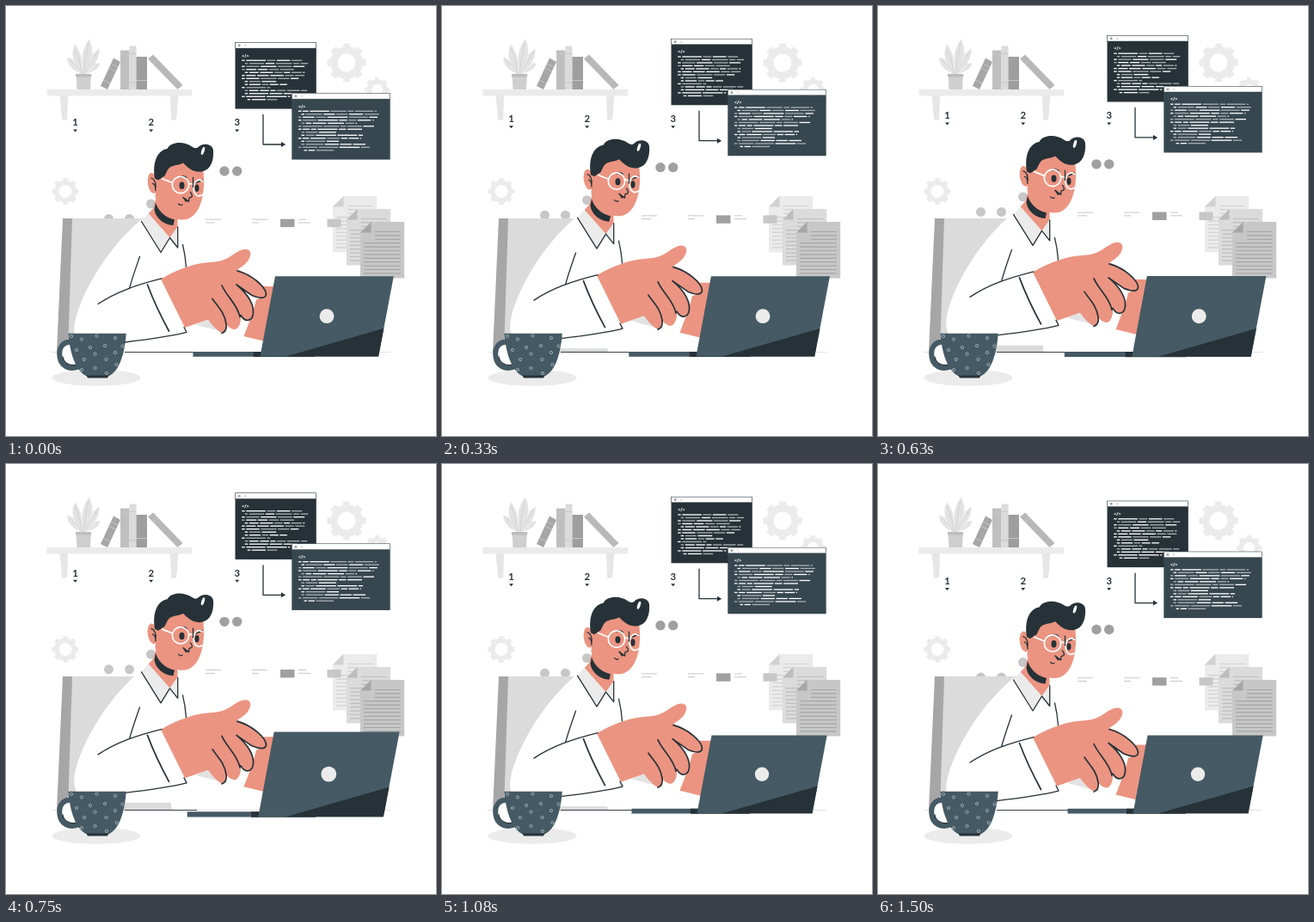
These frames come from a looping animation (500x500 px, 1.54 s). An HTML page:

```html
<!DOCTYPE html>
<html lang="en">
<head>
<meta charset="utf-8">
<title>Developer at work</title>
<style>
  html, body { margin: 0; width: 100%; height: 100%; overflow: hidden; background: #fff; }
  svg { display: block; width: 100%; height: 100%; }
  .ink { fill: none; stroke: #263238; stroke-width: 1.3; stroke-linecap: round; stroke-linejoin: round; }
  .bold { stroke-width: 1.7; }
  .dark { fill: #263238; }
  .skin { fill: #eb9481; }
  .label { font: 700 11.3px Lato, sans-serif; text-anchor: middle; fill: #263238; }
  .tag { font: 700 5.6px "Open Sans", sans-serif; fill: #fff; }
</style>
</head>
<body>
<svg viewBox="0 0 500 500">
  <g id="gears" fill="none" stroke="#ebebeb"></g>

  <g id="shelf">
    <path fill="#e6e6e6" d="M62.5 104h9.5l-.8 28.5h-6zM191 104h9.5l-2.5 28.5h-6z"/>
    <path fill="#ebebeb" d="M47.5 97h168.5v7.5h-168.5z"/>
    <g fill="#e3e3e3" stroke="#fff" stroke-width=".6">
      <path d="M89 80C78 76 70 68 71 59C81 63 88 71 90 80z"/>
      <path d="M91 80C99 77 108 75 110 66C101 66 94 72 91 80z"/>
      <path d="M88 80C78 68 74 56 80 44C88 54 91 68 90 80z"/>
      <path d="M91 80C92 66 98 56 109 49C109 62 102 73 91 80z"/>
      <path d="M90 80C86 64 88 48 97 38C104 52 100 68 90 80z"/>
    </g>
    <path fill="none" stroke="#c7c7c7" stroke-width=".6" d="M90 80Q92 60 96 43M89 80Q86 62 80 49M91 80Q98 64 107 53M89 80Q82 69 74 62"/>
    <path fill="#cfcfcf" d="M81.5 79h17.5l-1 18h-15.5z"/>
    <path fill="#bdbdbd" d="M81 79h18.2v3.5h-18.2z"/>
    <path fill="#a6a6a6" d="M125 60.5l8 4.5-15 32-8-4z"/>
    <path fill="#bfbfbf" d="M133 51.5h10.5v45.5h-10.5z"/>
    <path fill="#dbdbdb" d="M143.5 46.5h8v50.5h-8z"/>
    <path fill="#9e9e9e" d="M151.5 59h12.5v38h-12.5z"/>
    <path fill="#b8b8b8" d="M165 61.5l6-5 34.5 35.5-6 5z"/>
    <path fill="none" stroke="#c7c7c7" d="M122 67l8 4M119.5 72l8 4M113 86l8 4M133 56h10.5M143.5 55.5h8M143.5 89h8M151.5 86.5h12.5M171 67.5l6-5M194 91l6-5"/>
  </g>

  <g id="pages"></g>

  <g class="float">
    <g id="steps"></g>
    <path fill="#a0a0a0" d="M319 248.2h16.5v9.4h-16.5z"/>
    <path fill="#c7c7c7" d="M373.5 248.2h16v9.4h-16z"/>
    <path stroke="#c7c7c7" d="M232 248.7h18M232 252.5h11M286 248.7h18M286 252.5h8M340 248.7h9M340 252.5h14"/>
    <g fill="#c7c7c7"><circle cx="119.5" cy="248" r="5.5"/><circle cx="143.5" cy="248" r="5.5"/><circle cx="168.5" cy="230.5" r="5.5"/></g>
    <g fill="#a0a0a0"><circle cx="254" cy="192.5" r="5.7"/><circle cx="268.7" cy="192.5" r="5.7"/></g>
    <path class="ink" stroke-linecap="butt" d="M299 127V161.5H321"/>
    <path class="dark" d="M320 158.5l5.2 3-5.2 3z"/>
    <g id="windows"></g>
  </g>

  <path fill="#dbdbdb" d="M76 247H167L193 402.5H70z"/>
  <path fill="#a6a6a6" d="M66 247H77L72 402.5H59z"/>
  <path stroke="#d0d0d0" stroke-width=".6" d="M53 402.5H447"/>

  <g class="float">
    <path class="skin" d="M299 326.5H316L303 391L276.5 384.5L287 357L291 342L302 337z"/>
    <path fill="#fff" d="M157 249C113 286 84 342 79.5 372C78 384 82 394 90 403H222L234 380L214 320L207 281L199.5 256z"/>
    <path fill="#e3e3e3" d="M220 371L242 361L258 381z"/>

    <path class="skin" d="M174 226L171 236L165.5 242L190.5 270L199.5 258V240z"/>
    <path class="dark" d="M174 229C177 239 185 246.5 196 249L194.5 255.5C183 255 174 247 172.5 237z"/>
    <path fill="#ebebeb" d="M165.5 241.5L157.5 251L180 287L190.5 270zM190.5 270L199.5 281V257z"/>
    <path class="ink" d="M157.5 251L180 287L190.5 270L199.7 281.5V257.5"/>
    <path class="ink" d="M205.5 278Q208.5 290 209.5 304"/>

    <g id="head">
      <ellipse class="skin" cx="170.5" cy="206.5" rx="5.7" ry="12" transform="rotate(-8 170.5 206.5)"/>
      <path class="skin" d="M176 190L188 175H226C230 190 231 205 229.5 215C228 232 220 249 206 249C190 249 176 240 173.5 222z"/>
      <path class="ink" d="M169 200.5Q175 203 174 212M170.5 207Q174 208 174 215"/>
      <path class="dark" d="M173 201C170.5 185 174 169 187.5 166.5C192 157.5 208 158 216 164Q220 167 223 165C228 159 240 160 241 168C242 180 238 191 228 193C219 194.500 213 190 206 183C199 187 192 184.5 188 191L184.5 198L177 203z"/>
      <ellipse cx="229" cy="169" rx="1.7" ry="4.7" fill="#fff" transform="rotate(18 229 169)"/>
      <path class="ink bold" d="M203 199.5Q207 197.5 210 200.500M219.5 206.500L228 203"/>
      <ellipse class="dark" cx="204.5" cy="209.2" rx="3" ry="4.2"/>
      <ellipse class="dark" cx="222" cy="212.3" rx="2.5" ry="4.2"/>
      <g fill="none" stroke="#fff" stroke-width="1.7">
        <circle cx="203" cy="208.500" r="9.7"/>
        <path d="M229 204.500C222 199 217.5 208 218 213C219 222 225 223 229 219.500M181 201L193.5 206M212.5 207.500Q215 206 218.3 209"/>
      </g>
      <path class="ink" d="M217.5 200V211M214.5 217Q219 223 213 223.500L212.500 228L206 223"/>
      <path class="dark" d="M205 222.5L212.5 227L209 228.500z"/>
      <path class="ink" d="M200.5 230.500Q203 233 205 231.500"/>
    </g>

    <path class="skin" d="M180 318C200 306 220 299 243 298C257 297 263 289 271 285.5C279 281 286 284 284 291C282 299 275 303 269 307C286 313 302 326 302.5 335.5C302 342 293 340 286 337L268 324.5C281 335 291 350 286.5 362C283 367 278 367 273 360C274 370 269 379 263.5 376Q258 374 256 370C256 378 253 383 248 379Q241 374 235 365L208 374.5z"/>
    <path class="ink bold" d="M269 308.5C286 313 302 327 302.5 335.5C302 342 293 340 286 337L268 324.5C281 335 291 350 286.5 362C283 368 277 367 273 360M251 325.500C257 339 269 347 272 362M240 341C247 351 254 357 256 370C257 377 254 380 251 381"/>
    <path class="ink" d="M107 347C128 333 151 325 181 317.5M155.5 292C151 305 147 316 143.5 329M138 391.5C168 388 190 385 210 380L207 374"/>
    <path class="ink bold" d="M164.5 324.5Q174 350 189.5 378.5"/>
  </g>

  <path stroke="#263238" stroke-width=".9" d="M138 402.5H222"/>
  <g id="laptop">
    <path fill="#455a64" d="M220.5 400.8H298V406.5H220.5z"/>
    <path class="dark" d="M289 400.8H358V406.7H289z"/>
    <path fill="#455a64" d="M313.5 315.5H447.7L430.5 406.3H296.5z"/>
    <path class="dark" d="M326 406.3L436.6 374.5L430.5 406.3z"/>
    <circle cx="372" cy="360.7" r="8.2" fill="#ebebeb"/>
  </g>

  <ellipse cx="105" cy="432.3" rx="51.5" ry="9.5" fill="#ebebeb"/>
  <path fill="#fff" stroke="#455a64" stroke-width="6" d="M79 391.5C66 388 61 398 62.5 408C64 418 73 424 84 419.5"/>
  <path class="ink" d="M66 408C67 415 74 419 81 417"/>
  <path fill="#455a64" d="M72.5 380.8H139.8C138 404 132 425 119 430.5H94C81 425 74 403 72.5 380.8z"/>
  <path class="dark" d="M93.5 429.5H119.5L118 432.5H95z"/>
  <g id="dots" fill="none" stroke="#b0bec5" stroke-width=".8"></g>
</svg>

<script>
const $ = id => document.getElementById(id);
const add = (id, markup) => $(id).insertAdjacentHTML('beforeend', markup);

let seed = 7;
const random = () => (seed = seed * 16807 % 2147483647) / 2147483647;

function gear(x, y, r, hole) {
  const rim = r * .84, teeth = r - rim + 1;
  add('gears', `<circle cx="${x}" cy="${y}" r="${(rim + hole) / 2}" stroke-width="${rim - hole}"/>
    <circle cx="${x}" cy="${y}" r="${r - teeth / 2}" stroke-width="${teeth}" pathLength="16"
      stroke-dasharray="1 1" stroke-dashoffset=".5"/>`);
}

function page(x, y, fill, ink) {
  let lines = '';
  for (let i = 0; i < 12; i++) lines += `M${x + (i < 3 ? 17 : 4)} ${y + 11.5 + i * 4.4}H${x + 47}`;
  add('pages', `<path fill="${fill}" d="M${x + 12.5} ${y}h38.7v65.5h-51.2v-53z"/>
    <path stroke="${ink}" stroke-width="1.2" d="${lines}"/>
    <path fill="${ink}" d="M${x + 12.5} ${y}v12.5h-12.5z"/>`);
}

const indents = [0, 3.5, 0, 0, 3.5, 0, 0, 3.5, 3.5, 0, 3.5, 3.5, 0, 6.5];

function codeLines(x, y, ends) {
  let out = '';
  ends.forEach((end, row) => {
    let from = indents[row], length = 3.5;
    while (from < end - 1) {
      const to = Math.min(from + length, end);
      const color = random() < .65 ? '#fff' : '#a9b0b3';
      out += `<path stroke="${color}" d="M${x + from} ${y + row * 3.5}H${x + to}"/>`;
      from = to + 1.6;
      length = 6 + random() * 18;
    }
  });
  return `<g stroke-width="1.3">${out}</g>`;
}

function codeWindow(x, y, width, fill, ends) {
  add('windows', `<rect x="${x}" y="${y}" width="${width}" height="77.3" fill="${fill}"/>
    <rect x="${x + .2}" y="${y + .2}" width="${width - .4}" height="6.6" fill="#fff" stroke="${fill}" stroke-width=".4"/>
    <circle cx="${x + 4.7}" cy="${y + 3.5}" r="1.5" fill="#a0a0a0"/>
    <circle cx="${x + 11.7}" cy="${y + 3.5}" r="1.3" fill="#e0e0e0"/>
    <text class="tag" x="${x + 7.5}" y="${y + 17.3}">&lt;/&gt;</text>
    ${codeLines(x + 7.7, y + 21, ends)}`);
}

gear(396, 66, 22.5, 10.5);
gear(69, 215.5, 15.5, 7.5);
gear(431.5, 97.5, 14.5, 6.5);

page(380, 221, '#ebebeb', '#d1d1d1');
page(396, 236, '#dbdbdb', '#bdbdbd');
page(412, 251, '#c7c7c7', '#a6a6a6');

[80.5, 168.7, 268.7].forEach((x, i) => add('steps',
  `<text class="label" x="${x}" y="139.9">${i + 1}</text><path class="dark" d="M${x - 2.5} 144h5l-2.5 3z"/>`));

codeWindow(266.5, 42.8, 94.3, '#263238', [70, 77, 73, 61, 73, 73, 66, 40, 55, 33, 76, 64, 56, 41]);
codeWindow(332.3, 101.8, 114.4, '#37474f', [91, 96, 94, 88, 68, 88, 74, 45, 75, 73, 47, 78, 83, 41]);

[[76, 384], [88, 387.5], [105.5, 383.5], [127, 386], [82, 400], [98, 397], [115, 395], [135.5, 395.5],
 [127, 403], [91, 411], [103.5, 404.5], [116.5, 411], [103.5, 421], [88, 423], [117, 427], [128.5, 417]]
  .forEach(([x, y]) => add('dots', `<circle cx="${x}" cy="${y}" r="1.6"/>`));

const FRAMES = 37, FRAME_MS = 1000 / 24, LOOP_MS = 1540;
const floats = document.querySelectorAll('.float');
// Two beats per loop: [phase, strength]
const beat = [[0, 0], [.1, 1], [.3, 0], [.4, 0], [.5, 1], [.6, 0], [1, 0]];

function beatAt(p) {
  const i = beat.findIndex(key => key[0] > p);
  const [p0, v0] = beat[i - 1], [p1, v1] = beat[i];
  return v0 + (v1 - v0) * (p - p0) / (p1 - p0);
}

function draw() {
  const step = Math.floor((performance.now() % LOOP_MS + 5) / FRAME_MS);
  const phase = (step + 1) % FRAMES / FRAMES;
  const floatPhase = phase + .5 / FRAMES;
  const y = .3 - 10 * (1 - Math.abs(1 - 2 * floatPhase));
  const scale = 1 + .1 * beatAt(phase);
  floats.forEach(g => g.setAttribute('transform', `translate(0 ${y})`));
  $('laptop').setAttribute('transform', `translate(334 361) scale(${scale}) translate(-334 -361)`);
  requestAnimationFrame(draw);
}
draw();
</script>
</body>
</html>
```
